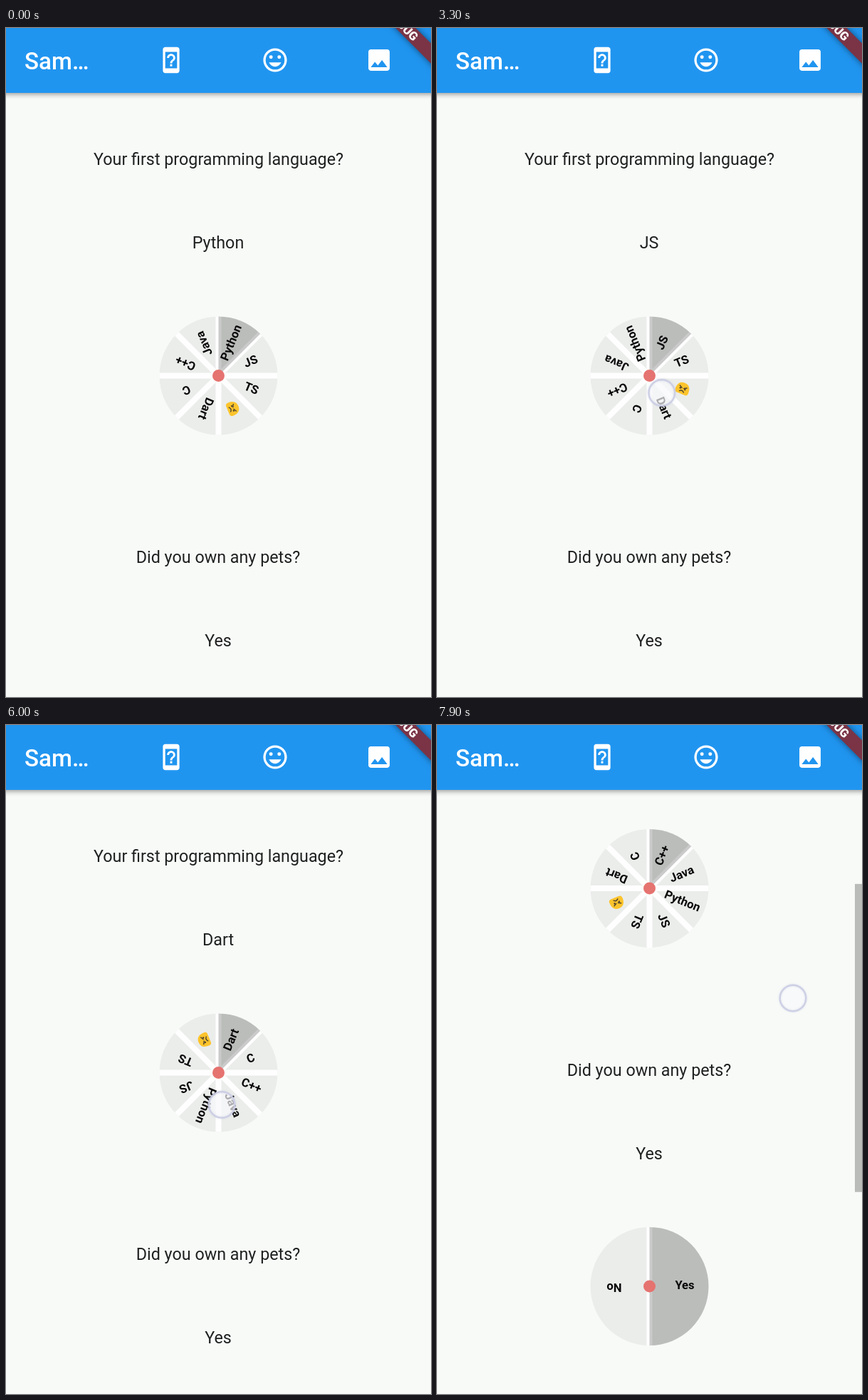
Recreate the animation shown at these times as an HTML page with a canvas. Size 597x938 px, loop 8 s.

```html
<!DOCTYPE html>
<html lang="en">
<head>
<meta charset="utf-8">
<title>Wheel picker</title>
<style>
html, body { margin: 0; width: 100%; height: 100%; overflow: hidden; background: #f8faf8; }
canvas { display: block; }
</style>
</head>
<body>
<canvas id="stage" width="597" height="938"></canvas>
<script>
const ctx = document.getElementById('stage').getContext('2d');
const W = 597, H = 938, BAR = 91, LOOP = 8000, STEP = 100;
const CX = 298.5, RADIUS = 83, TAU = Math.PI * 2;
const ANGRY = 'angry';
const LANGS = ['Python', 'JS', 'TS', ANGRY, 'Dart', 'C', 'C++', 'Java'];

// Each turn moves the wheel back by one slice: [start, end]
const TURNS = [[1800, 2330], [4220, 4820], [4950, 5350], [5550, 5950], [6050, 6400], [6550, 6980]];

// Finger strokes: [start, x, y, stop, x, y]; each one fades out after its stop
const STROKES = [
  [1000, 306, 502, 1400, 345, 526],
  [1800, 310, 540, 2100, 356, 525],
  [3200, 306, 506, 3600, 345, 528],
  [4100, 310, 540, 4400, 354, 519],
  [4800, 293, 530, 5100, 354, 520],
  [5400, 292, 521, 5700, 352, 522],
  [5950, 293, 535, 6250, 354, 520],
  [6500, 295, 544, 6800, 354, 520]
];

const SCROLL = [[7200, 0], [7300, 13.5], [7400, 40], [7500, 72], [7600, 118], [7900, 258.5]];

const DEVICE = new Path2D('M17 1H7c-1.1 0-2 .9-2 2v18c0 1.1.9 2 2 2h10c1.1 0 2-.9 2-2V3c0-1.1-.9-2-2-2z' +
  'M17 19H7V5h10z' +
  'M12 6.72c-1.96 0-3.5 1.52-3.5 3.47h1.75c0-.93.81-1.75 1.75-1.75s1.75.82 1.75 1.75' +
  'c0 1.75-2.63 1.57-2.63 4.45h1.76c0-1.96 2.62-2.19 2.62-4.45 0-1.95-1.54-3.47-3.5-3.47z' +
  'M11.12 15.5h1.76v1.76h-1.76z');
const MOOD = new Path2D('M2 12a10 10 0 1 0 20 0a10 10 0 1 0-20 0zM4 12a8 8 0 1 0 16 0a8 8 0 1 0-16 0z' +
  'M14 9.5a1.5 1.5 0 1 0 3 0a1.5 1.5 0 1 0-3 0zM7 9.5a1.5 1.5 0 1 0 3 0a1.5 1.5 0 1 0-3 0z' +
  'M12 17.5c2.33 0 4.31-1.46 5.11-3.5H6.89c.8 2.04 2.78 3.5 5.11 3.5z');
const IMAGE = new Path2D('M21 19V5c0-1.1-.9-2-2-2H5c-1.1 0-2 .9-2 2v14c0 1.1.9 2 2 2h14c1.1 0 2-.9 2-2z' +
  'M8.5 13.5l2.5 3.01L14.5 12l4.5 6H5z');

const clamp = v => Math.min(1, Math.max(0, v));
const mix = (a, b, p) => a + (b - a) * p;
const smooth = p => p * p * (3 - 2 * p);

function track(keys, t) {
  if (t <= keys[0][0]) return keys[0][1];
  for (let i = 1; i < keys.length; i++) {
    const [t0, a] = keys[i - 1], [t1, b] = keys[i];
    if (t <= t1) return mix(a, b, (t - t0) / (t1 - t0));
  }
  return keys[keys.length - 1][1];
}

function at(x, y, angle, draw) {
  ctx.save();
  ctx.translate(x, y);
  ctx.rotate(angle);
  draw();
  ctx.restore();
}

function disc(x, y, r, color) {
  ctx.fillStyle = color;
  ctx.beginPath();
  ctx.arc(x, y, r, 0, TAU);
  ctx.fill();
}

function label(str, x, y, size, weight = 400, color = '#1f2120', align = 'center') {
  ctx.font = `${weight} ${size}px Roboto, sans-serif`;
  ctx.textAlign = align;
  ctx.fillStyle = color;
  ctx.fillText(str, x, y);
}

function angryFace(x, y, scale) {
  at(x, y, 0, () => {
    ctx.scale(scale, scale);
    ctx.fillStyle = '#fcc42c';
    ctx.beginPath();
    ctx.moveTo(-14, 5);
    ctx.bezierCurveTo(-14, -6, -9, -11.5, 0, -11.5);
    ctx.bezierCurveTo(9, -11.5, 14, -6, 14, 5);
    ctx.bezierCurveTo(14, 10, 12, 11.5, 8, 11.5);
    ctx.lineTo(-8, 11.5);
    ctx.bezierCurveTo(-12, 11.5, -14, 10, -14, 5);
    ctx.fill();
    ctx.strokeStyle = '#50432f';
    ctx.lineWidth = 2;
    ctx.lineCap = 'round';
    ctx.beginPath();
    for (const s of [-1, 1]) {
      ctx.moveTo(s * 7.5, -3.5);
      ctx.lineTo(s * 2, -0.5);
    }
    ctx.moveTo(-4.5, 7);
    ctx.quadraticCurveTo(0, 2.5, 4.5, 7);
    ctx.stroke();
    disc(-5, 0.8, 1.8, '#50432f');
    disc(5, 0.8, 1.8, '#50432f');
  });
}

function wheel(items, y, turn, selected) {
  const slice = TAU / items.length;
  disc(CX, y, RADIUS, '#ebedeb');
  at(CX, y, turn - Math.PI / 2, () => {
    ctx.strokeStyle = '#fdfefd';
    ctx.lineWidth = 8;
    ctx.beginPath();
    items.forEach((_, i) => {
      ctx.moveTo(0, 0);
      ctx.lineTo(RADIUS * Math.cos(i * slice), RADIUS * Math.sin(i * slice));
    });
    ctx.stroke();
    if (selected >= 0) {
      ctx.fillStyle = 'rgba(0,0,0,.205)';
      ctx.beginPath();
      ctx.moveTo(0, 0);
      ctx.arc(0, 0, RADIUS, selected * slice, (selected + 1) * slice);
      ctx.fill();
    }
    items.forEach((item, i) => at(0, 0, (i + 0.5) * slice, () => {
      if (item === ANGRY) angryFace(50, -1.5, 0.7);
      else label(item, 49.5, 4.2, 16.6, 700, '#080808');
    }));
  });
  disc(CX, y, 8.5, '#e57370');
}

function answer(item, y) {
  if (item === ANGRY) {
    angryFace(223, y - 8, 1);
    label('None of these', 241.5, y, 23.3, 400, '#1f2120', 'left');
  } else {
    label(item, 298, y, 23.3);
  }
}

function page(t, scroll) {
  let index = 0, turn = 0, moving = false;
  for (const [start, end] of TURNS) {
    const p = clamp((t - start) / (end - start));
    turn -= smooth(p) * TAU / 8;
    if (p === 1) index++;
    if (t >= start && p < 1) moving = true;
  }
  ctx.save();
  ctx.translate(0, -scroll);
  label('Your first programming language?', 298.5, 192, 23.3);
  answer(LANGS[index], 309);
  wheel(LANGS, 487.5, turn, moving ? -1 : index);
  label('Did you own any pets?', 298, 750, 23.3);
  answer('Yes', 867);
  wheel(['Yes', 'No'], 1045.5, 0, 0);
  ctx.restore();
}

function scrollbar(t, scroll) {
  const ratio = 0.51;
  ctx.fillStyle = `rgba(0,0,0,${0.25 * clamp((t - 7300) / 300)})`;
  ctx.fillRect(587, BAR + scroll * ratio, 10, (H - BAR) * ratio);
}

function icon(path, x) {
  at(x, 45, 0, () => {
    ctx.scale(1.66, 1.66);
    ctx.translate(-12, -12);
    ctx.fillStyle = '#fff';
    ctx.fill(path, 'evenodd');
  });
}

function shadowRect(x, y, w, h, color, blur, dy, shade) {
  ctx.save();
  ctx.shadowColor = shade;
  ctx.shadowBlur = blur;
  ctx.shadowOffsetY = dy;
  ctx.fillStyle = color;
  ctx.fillRect(x, y, w, h);
  ctx.restore();
}

function header() {
  shadowRect(-20, -20, W + 40, BAR + 20, '#2095f0', 7, 2, 'rgba(0,0,0,.4)');
  label('Sam…', 26, 58, 33.2, 500, '#fff', 'left');
  icon(DEVICE, 232);
  icon(MOOD, 378);
  icon(IMAGE, 524);
  at(W, -44, Math.PI / 4, () => {
    shadowRect(-90, 46.4, 180, 19.9, '#7a3446', 10, 0, 'rgba(0,0,0,.5)');
    label('DEBUG', 0, 62.4, 16.9, 900, '#fff');
  });
}

function finger(x, y, alpha) {
  ctx.save();
  ctx.globalAlpha = alpha;
  disc(x, y, 18.5, 'rgba(249,250,252,.68)');
  ctx.lineWidth = 2.4;
  ctx.strokeStyle = 'rgba(202,205,228,.9)';
  ctx.shadowColor = 'rgba(190,195,220,.5)';
  ctx.shadowBlur = 3;
  ctx.beginPath();
  ctx.arc(x, y, 18.3, 0, TAU);
  ctx.stroke();
  ctx.restore();
}

function touches(t, scroll) {
  for (const [start, x0, y0, stop, x1, y1] of STROKES) {
    if (t < start || t >= stop + 200) continue;
    const p = clamp((t - start) / (stop - start));
    finger(mix(x0, x1, p), mix(y0, y1, p), 1 - clamp((t - stop) / 200));
  }
  if (t >= 7100) {
    const lead = 22 * clamp((7300 - t) / 200);
    finger(490 + (t - 7300) / 60, 641.5 + lead - scroll, 1);
  }
}

function frame(now) {
  const t = Math.floor((now % LOOP) / STEP) * STEP;
  const scroll = track(SCROLL, t);
  ctx.fillStyle = '#f8faf8';
  ctx.fillRect(0, 0, W, H);
  page(t, scroll);
  scrollbar(t, scroll);
  header();
  touches(t, scroll);
}

const origin = performance.now();
function tick() {
  frame(performance.now() - origin);
  requestAnimationFrame(tick);
}
tick();
</script>
</body>
</html>
```
